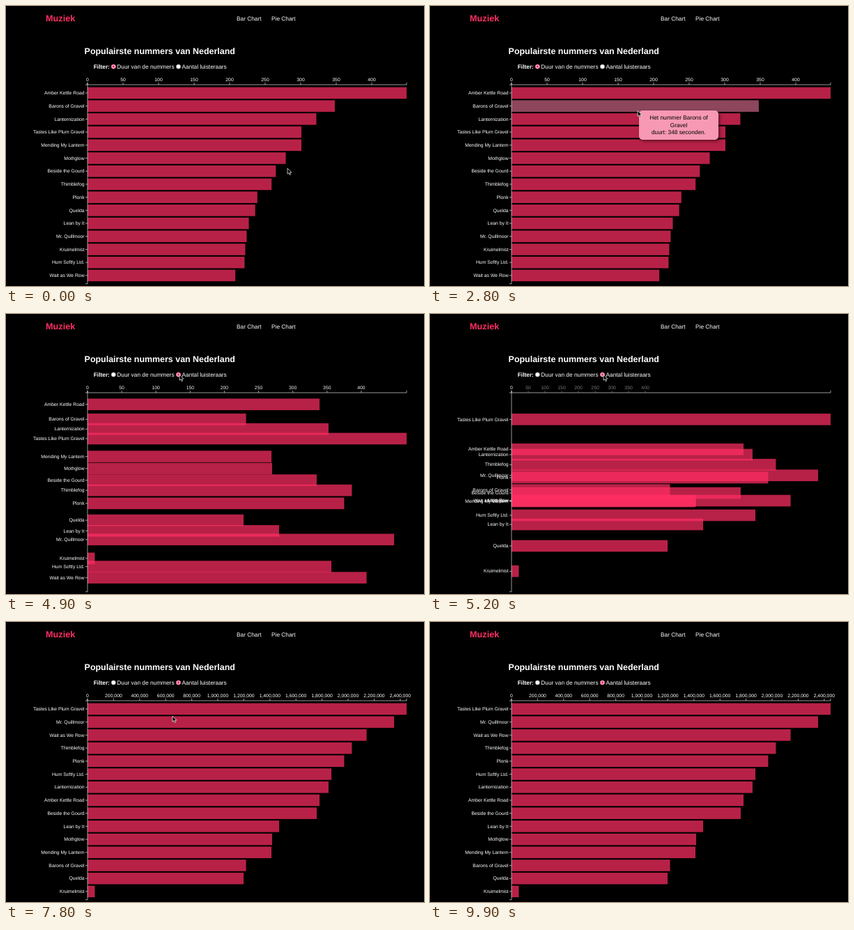
These frames come from a looping animation (600 px wide and 402 px high, 10 s). An HTML page:

```html
<!DOCTYPE html>
<html lang="nl">
<head>
<meta charset="utf-8">
<style>
  html, body { margin: 0; height: 100%; overflow: hidden; background: #000; }
  svg { display: block; width: 600px; height: 402px; fill: #fff;
    font: 8.32px "Liberation Sans", Arial, sans-serif; text-rendering: geometricPrecision; }
  .bold { font-weight: bold; }
  .title { font-size: 12.45px; }
  .brand { font-size: 12.7px; fill: #ff2e63; }
  .axis { font-size: 6.83px; }
  .line { stroke: #fff; stroke-width: .6; fill: none; }
  .bar { fill: #ff2e63; fill-opacity: .72; }
  .bar.hover { fill: #8d465c; fill-opacity: 1; }
  foreignObject { overflow: visible; }
  .tip { box-sizing: border-box; width: 114px; padding: 5.2px; border-radius: 5px;
    background: #f799b5; color: #000; line-height: 10.4px; text-align: center;
    box-shadow: 2px 2px 4px rgba(0, 0, 0, .5); }
</style>
</head>
<body>
<svg viewBox="0 0 600 402">
  <text class="bold brand" x="57" y="22.4">Muziek</text>
  <text x="331" y="21">Bar Chart</text>
  <text x="381" y="21">Pie Chart</text>
  <text class="bold title" x="112.6" y="68.8">Populairste nummers van Nederland</text>
  <text class="bold" x="125.8" y="90.3">Filter:</text>
  <text x="159.3" y="90.3">Duur van de nummers</text>
  <text x="252.5" y="90.3">Aantal luisteraars</text>
  <g id="chart"></g>
</svg>
<script>
const LEFT = 117, TOP = 113, WIDTH = 458, BAR_TOP = 116.6, STEP = 18.715, BAR_HEIGHT = 16.6;
const SWITCH = 4690, DURATION = 1000, LOOP = 10000, FRAME = 100;

// name, duration in seconds, listeners in thousands
const songs = [
  ['Amber Kettle Road', 449, 1781], ['Barons of Gravel', 348, 1217],
  ['Lanternization', 322, 1850], ['Tastes Like Plum Gravel', 301, 2449],
  ['Mending My Lantern', 301, 1412], ['Mothglow', 279, 1417],
  ['Beside the Gourd', 265, 1759], ['Thimblefog', 259, 2029],
  ['Plonk', 239, 1970], ['Quelda', 236, 1198], ['Lean by It', 227, 1471],
  ['Mr. Quillmoor', 224, 2353], ['Kruimelmist', 222, 56],
  ['Hum Softly Ltd.', 221, 1872], ['Wait as We Row', 208, 2142]
].map(([name, seconds, thousands], rank) => ({ name, seconds, listeners: thousands * 1000, rank }));
[...songs].sort((a, b) => b.listeners - a.listeners).forEach((song, i) => song.newRank = i);

// pointer: time, x, y
const path = [
  [0, 404, 233], [300, 404, 233], [700, 376, 146], [800, 376, 146], [1400, 350, 128],
  [1500, 350, 130], [1600, 350, 130], [2100, 330, 177], [2700, 300, 150], [3500, 285, 152],
  [3600, 285, 152], [3900, 279, 140], [4000, 263, 115], [4400, 249, 90], [4700, 249, 87],
  [5800, 249, 87], [6000, 249, 87], [6400, 248, 94.5], [6900, 234, 130], [7500, 231, 131],
  [7600, 231, 131], [7700, 238, 134.3], [7800, 239, 135], [8300, 246, 174], [8700, 250, 165],
  [9200, 262, 180], [9800, 240, 176]
];

const chart = document.getElementById('chart');
const lerp = (a, b, k) => a + (b - a) * k;
const cubicInOut = k => k < .5 ? 4 * k ** 3 : 1 - 4 * (1 - k) ** 3;

function pointerAt(t) {
  const i = path.findIndex(p => p[0] > t);
  if (i < 1) return null;
  const [a, b] = [path[i - 1], path[i]];
  const k = (t - a[0]) / (b[0] - a[0]);
  return { x: lerp(a[1], b[1], k), y: lerp(a[2], b[2], k) };
}

function radio(x, checked) {
  const color = checked ? '#f0356b' : '#999';
  return `<circle cx="${x}" cy="87" r="3.1" stroke="${color}" stroke-width=".7"/>` +
    (checked ? `<circle cx="${x}" cy="87" r="1.9" fill="${color}"/>` : '');
}

function xTick(value, scale, opacity) {
  const x = LEFT + value * scale;
  if (x > 640 || opacity <= 0) return '';
  return `<g opacity="${opacity}"><path class="line" d="M${x} ${TOP}v-3.1"/>
    <text x="${x}" y="108" text-anchor="middle">${value.toLocaleString('en')}</text></g>`;
}

function render(t) {
  const byListeners = t > SWITCH + 10;
  const e = cubicInOut(Math.min(1, Math.max(0, (t - SWITCH) / DURATION)));
  const pointer = pointerAt(t);
  const mouse = pointer && pointerAt(Math.max(0, t - FRAME));
  const scale = lerp(WIDTH / 449, WIDTH / 2449000, e);
  let bars = '', labels = '', tip = '';

  for (const song of songs) {
    const y = BAR_TOP + STEP * lerp(song.rank, song.newRank, e);
    const mid = y + BAR_HEIGHT / 2;
    const width = WIDTH * (byListeners ? song.listeners / 2449000 : song.seconds / 449);
    const hover = mouse && mouse.x > LEFT && mouse.x < LEFT + width &&
      mouse.y > y && mouse.y < y + BAR_HEIGHT;
    bars += `<rect class="bar ${hover ? 'hover' : ''}" x="${LEFT}" y="${y}" width="${width}" height="${BAR_HEIGHT}"/>`;
    labels += `<path class="line" d="M${LEFT} ${mid}h-3.1"/>
      <text x="112.6" y="${mid + 2.2}" text-anchor="end">${song.name}</text>`;
    if (hover) {
      const info = byListeners ? `luisteraars: ${song.listeners}.` : `duurt: ${song.seconds} seconden.`;
      tip = `<foreignObject x="${mouse.x}" y="${mouse.y}" width="114" height="42">
        <div class="tip">Het nummer ${song.name}<br>${info}</div></foreignObject>`;
    }
  }

  let ticks = xTick(0, scale, 1);
  for (let i = 1; i <= 8; i++) ticks += xTick(i * 50, scale, 1 - e);
  for (let i = 1; i <= 12; i++) ticks += xTick(i * 200000, scale, e);

  const cursor = pointer ? `<path transform="translate(${pointer.x} ${pointer.y})"
    d="M0 0V8.2L1.9 6.5 3.2 9.5 4.6 8.9 3.3 6H5.9Z" fill="#000" stroke="#fff" stroke-width=".7"/>` : '';

  chart.innerHTML = radio(154.3, !byListeners) + radio(247.5, byListeners) + bars +
    `<g class="axis">${ticks}${labels}
      <path class="line" d="M${LEFT} ${TOP - 3.1}v3.1h${WIDTH}v-3.1M${LEFT - 3.1} ${TOP}h3.1V398.8h-3.1"/></g>` +
    tip + cursor;
}

let last = -1;
const start = performance.now();
function tick() {
  const t = Math.floor((performance.now() - start) % LOOP / FRAME) * FRAME;
  if (t !== last) render(last = t);
  requestAnimationFrame(tick);
}
tick();
</script>
</body>
</html>
```
